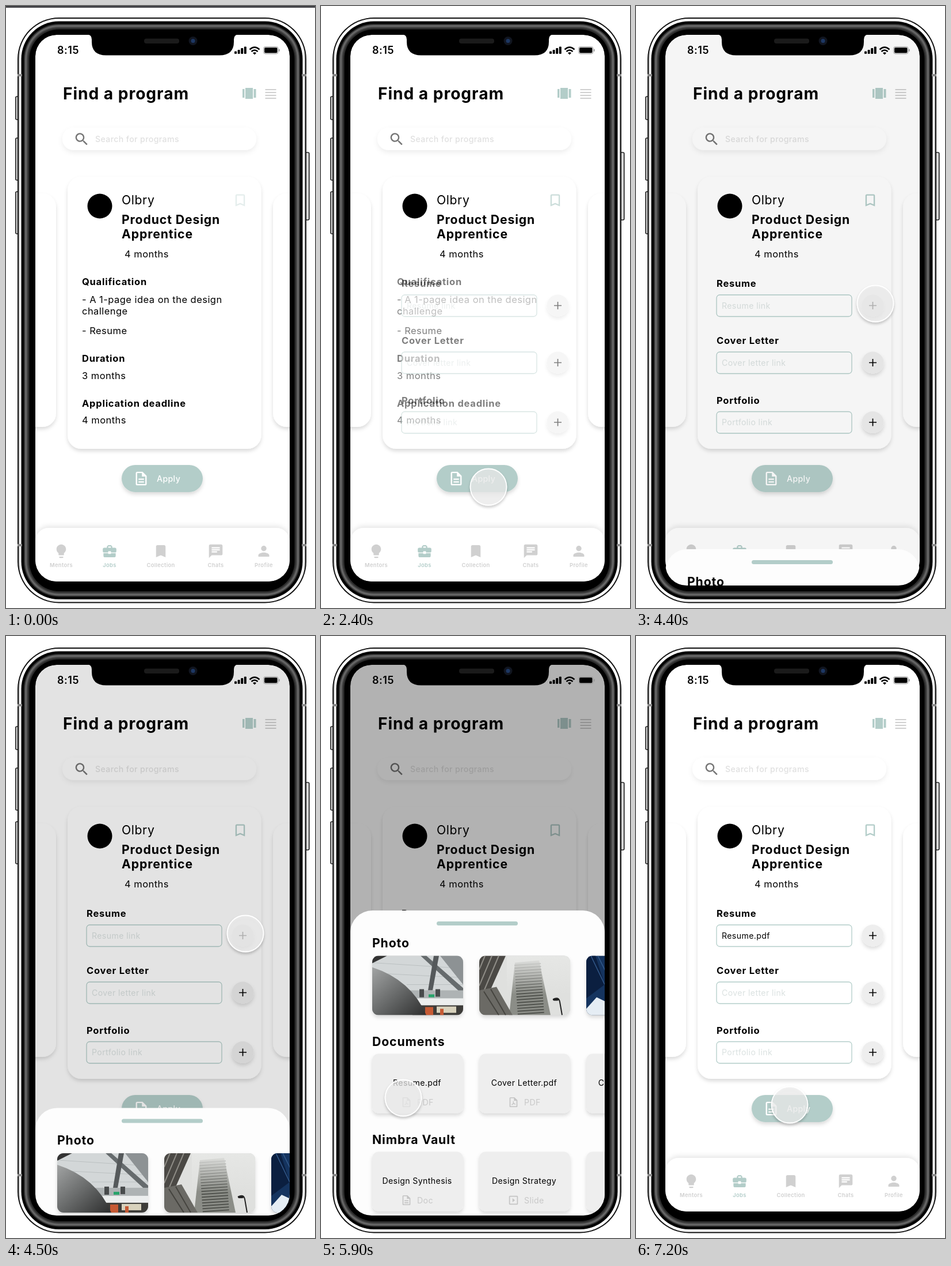
Recreate the animation shown at these times as an HTML page. Size 537 px wide and 1044 px high, loop 7.3 s.

```html
<!DOCTYPE html>
<html lang="en">
<head>
<meta charset="utf-8">
<title>Program finder</title>
<style>
html, body { margin: 0; width: 100%; height: 100%; overflow: hidden; background: #fff; }
svg { display: block; width: 537px; height: 1044px; }
text { font: 400 16.5px Inter, "Open Sans", sans-serif; letter-spacing: .028em; }
.title { font-size: 28.2px; font-weight: 700; letter-spacing: .033em; }
.head { font-size: 21.2px; font-weight: 700; letter-spacing: .042em; }
.name { font-size: 21.2px; }
.bold { font-weight: 700; letter-spacing: .046em; }
.small { font-size: 14.1px; }
.mid { font-size: 14.1px; font-weight: 500; }
.clock { font-size: 18px; font-weight: 600; }
.nav { font-size: 9.4px; font-weight: 600; letter-spacing: .036em; text-anchor: middle; }
.file { font-size: 14.1px; text-anchor: middle; }
</style>
</head>
<body>
<svg id="stage" viewBox="0 0 537 1044"></svg>
<script>
const GREEN = '#b3cdc9', GREY = '#d0d0d0';

const ICONS = {
  search: 'M15.5 14h-.8l-.3-.3A6.5 6.5 0 1 0 13.700 14.400l.3.3v.8l5 5 1.500-1.500zM9.500 14a4.500 4.500 0 1 1 0-9 4.500 4.500 0 0 1 0 9z',
  bulb: 'M9 21c0 .5.4 1 1 1h4c.6 0 1-.5 1-1v-1H9zM12 2C8.100 2 5 5.100 5 9c0 2.400 1.200 4.500 3 5.700V17c0 .5.4 1 1 1h6c.6 0 1-.5 1-1v-2.300c1.800-1.300 3-3.400 3-5.700 0-3.900-3.100-7-7-7z',
  jobs: 'M10 16v-1H3v4c0 1.100.9 2 2 2h14c1.100 0 2-.9 2-2v-4h-7v1zM20 7h-4V5l-2-2h-4L8 5v2H4c-1.100 0-2 .9-2 2v3c0 1.100.9 2 2 2h6v-2h4v2h6c1.100 0 2-.9 2-2V9c0-1.100-.9-2-2-2zM14 7h-4V5h4z',
  mark: 'M17 3H7c-1.100 0-2 .9-2 2v16l7-3 7 3V5c0-1.100-.9-2-2-2z',
  chat: 'M20 2H4c-1.100 0-2 .9-2 2v18l4-4h14c1.100 0 2-.9 2-2V4c0-1.100-.9-2-2-2zM6 9h12v2H6zM14 14H6v-2h8zM18 8H6V6h12z',
  person: 'M12 12a4 4 0 1 0 0-8 4 4 0 0 0 0 8zM12 14c-2.700 0-8 1.300-8 4v2h16v-2c0-2.700-5.300-4-8-4z',
  page: 'M14 2H6c-1.100 0-2 .9-2 2v16c0 1.100.9 2 2 2h12c1.100 0 2-.9 2-2V8zM18 20H6V4h7v5h5z',
  slide: 'M10 8v8l5-4zM19 3H5c-1.100 0-2 .9-2 2v14c0 1.100.9 2 2 2h14c1.100 0 2-.9 2-2V5c0-1.100-.9-2-2-2zM19 19H5V5h14z'
};
ICONS.outline = ICONS.mark + 'M17 18l-5-2.200L7 18V5h10z';
ICONS.doc = ICONS.page + 'M8 16h8v2H8zM8 12h8v2H8z';
ICONS.pdf = ICONS.page + 'M8 17l3-3v-4h1.500v3.500l3.500 2v1.500l-4-1.500-3 2.500z';

const icon = (name, cx, cy, fill, s = 1.18) =>
  `<path transform="translate(${cx - 12 * s} ${cy - 12 * s}) scale(${s})" fill="${fill}" fill-rule="evenodd" d="${ICONS[name]}"/>`;
const rect = (x, y, w, h, r, fill, more = '') =>
  `<rect x="${x}" y="${y}" width="${w}" height="${h}" rx="${r}" fill="${fill}" ${more}/>`;
const text = (x, y, str, cls = '', fill = '#000', more = '') =>
  `<text x="${x}" y="${y}" class="${cls}" fill="${fill}" ${more}>${str}</text>`;
const poly = (points, fill) => `<polygon points="${points}" fill="${fill}"/>`;
const line = (d, stroke, w, more = '') =>
  `<path d="${d}" fill="none" stroke="${stroke}" stroke-width="${w}" ${more}/>`;
const SHADOW = 'filter="url(#drop)"';

const defs = `<defs>
  <filter id="drop" x="-20%" y="-30%" width="140%" height="170%"><feDropShadow dx="0" dy="4" stdDeviation="3" flood-opacity=".14"/></filter>
  <filter id="soft" x="-20%" y="-30%" width="140%" height="170%"><feDropShadow dx="0" dy="4" stdDeviation="4" flood-opacity=".07"/></filter>
  <filter id="lift" x="-10%" y="-30%" width="120%" height="160%"><feDropShadow dx="0" dy="-3" stdDeviation="4" flood-opacity=".1"/></filter>
  <filter id="press" x="-30%" y="-30%" width="160%" height="170%"><feDropShadow dx="0" dy="3" stdDeviation="2" flood-opacity=".25"/></filter>
  <clipPath id="screen"><rect x="51" y="50" width="442" height="948" rx="37"/></clipPath>
  <clipPath id="full"><rect x="51" y="50" width="442" height="955" rx="37"/></clipPath>
  <clipPath id="photo"><rect width="158" height="103" rx="11"/></clipPath>
  <linearGradient id="cone" x2="1" y2="1"><stop stop-color="#a2a4a4"/><stop offset=".5" stop-color="#686a6a"/><stop offset="1" stop-color="#2d2e2e"/></linearGradient>
  <linearGradient id="fog" x2="0" y2="1"><stop stop-color="#e6e7e5"/><stop offset=".65" stop-color="#e6e7e5" stop-opacity="0"/></linearGradient>
  <linearGradient id="rim" x2="1" y2="0"><stop stop-color="#aaa"/><stop offset=".006" stop-color="#fff"/><stop offset=".994" stop-color="#fff"/><stop offset="1" stop-color="#aaa"/></linearGradient>
</defs>`;

// Nested rounded rectangles: [inset, fill]
const body = () => {
  const keys = [[16, 157, 40], [16, 229, 73], [16, 322, 73], [519, 254, 117]]
    .map(([x, y, h]) => rect(x + .8, y, 7, h, 2, '#d5d5d5', 'stroke="#222" stroke-width="1.6"')).join('');
  const rings = [[0, '#111'], [2, 'url(#rim)'], [6.5, '#000'], [11, '#333'], [13, '#666'], [16, '#484848'], [18, '#2c2c2c'], [20.5, '#000']]
    .map(([i, f]) => rect(20 + i, 20 + i, 502 - 2 * i, 1015.5 - 2 * i, 72 - i, f)).join('');
  const bands = [120, 935].map(y => rect(20, y - 2, 8, 4, 0, '#8a8a8a') + rect(514, y - 2, 8, 4, 0, '#8a8a8a')).join('');
  return keys + rings + bands;
};

const notch = `<path d="M141 49Q149 50 149 58V62Q149 85.500 174 85.500H371Q396 85.500 396 62V58Q396 50 404 49Z"/>`
  + rect(240, 56.500, 61, 8.500, 4, '#1b1b1b')
  + '<circle cx="325" cy="60.500" r="7.500" fill="#11151f"/><circle cx="325" cy="60.500" r="3.500" fill="#1d3763"/>';

const status = text(89, 83, '8:15', 'clock')
  + [4.500, 7, 10, 12.500].map((h, i) => rect(397 + i * 5.600, 83 - h, 4, h, 1, '#000')).join('')
  + line('M423.500 75.500Q432 67.500 440.500 75.500M426.500 79Q432 74 437.500 79', '#000', 2.600)
  + '<path d="M429 81.500Q432 79 435 81.500L432 84.500Z"/>'
  + rect(447.500, 70.500, 25.500, 12.500, 3.500, 'none', 'stroke="#999"') + rect(449, 72, 22.500, 9.500, 2, '#000')
  + rect(474, 74.500, 1.600, 4.500, .8, '#999');

const header = text(99, 161.500, 'Find a program', 'title')
  + rect(411, 144, 3.500, 15, 0, GREEN) + rect(416, 142, 13, 19, 0, GREEN) + rect(430.500, 144, 4, 15, 0, GREEN)
  + [145, 150, 155, 160].map(y => rect(450.500, y - 1, 19, 2, 0, GREY)).join('')
  + rect(98, 211, 337, 39, 19.500, '#fff', 'filter="url(#soft)"')
  + icon('search', 131.500, 231, '#757575', 1.200)
  + text(155, 236, 'Search for programs', 'mid', '#e0e0e0');

const cards = rect(-250, 325, 337, 405, 24, '#fff', SHADOW) + rect(464, 325, 337, 405, 24, '#fff', SHADOW)
  + rect(107, 296, 336.500, 472, 24, '#fff', SHADOW)
  + '<circle cx="163" cy="347" r="21.500"/>'
  + text(201, 343.500, 'Olbry', 'name')
  + text(201, 378, 'Product Design', 'head') + text(201, 403, 'Apprentice', 'head')
  + text(206, 436, '4 months')
  + `<g id="save">${icon('outline', 407, 337, GREEN)}</g>`;

const details = [
  [484, 'Qualification', 'bold'], [515, '- A 1-page idea on the design'], [535, 'challenge'], [569, '- Resume'],
  [617, 'Duration', 'bold'], [647, '3 months'], [695, 'Application deadline', 'bold'], [724, '4 months']
].map(([y, s, c]) => text(132, y, s, c)).join('');

const field = (y, label, hint, labelY) => text(140, labelY, label, 'bold')
  + rect(140, y, 235, 37.500, 5.500, '#fff', `stroke="${GREEN}" stroke-width="1.300"`)
  + text(149, y + 23.500, hint, 'small', '#dbe2e1', label == 'Resume' ? 'id="hint"' : '')
  + `<circle cx="411.500" cy="${y + 18.500}" r="19" fill="#eee" ${SHADOW}/>`
  + line(`M405 ${y + 18.500}h13m-6.500-6.500v13`, '#000', 1.700);
const form = field(501, 'Resume', 'Resume link', 487) + field(600, 'Cover Letter', 'Cover letter link', 585.500)
  + field(703.500, 'Portfolio', 'Portfolio link', 689.500) + text(149, 524.500, 'Resume.pdf', 'small', '#000', 'id="chosen"');

const button = rect(201, 796, 141, 47, 23.500, GREEN, SHADOW) + icon('doc', 235, 819.500, '#fff')
  + text(262, 824.500, 'Apply', 'mid', '#fff');

const nav = rect(51, 905, 442, 140, 24, '#fff', 'filter="url(#lift)"')
  + [['bulb', 96, 'Mentors'], ['jobs', 180, 'Jobs'], ['mark', 269, 'Collection'], ['chat', 364.500, 'Chats'], ['person', 448, 'Profile']]
    .map(([name, x, label]) => {
      const c = name == 'jobs' ? GREEN : GREY;
      return icon(name, x, 945.500, c) + text(x, 972.500, label, 'nav', c);
    }).join('');

const photos = [
  rect(0, 0, 158, 103, 0, '#d3d7d8') + line('M0 12L158 22M0 30L158 38M60 50H158', '#bbc0c1', 1)
    + poly('0,0 26,0 0,13', '#333') + poly('118,0 158,0 158,50', '#8d9294') + poly('84,0 94,0 158,56 158,68', '#666b6d')
    + poly('107,0 116,0 105,60 97,60', '#55595b')
    + rect(60, 60, 98, 14, 0, '#aeb3b4') + rect(82, 58, 8, 14, 0, '#484b4c') + rect(110, 58, 8, 13, 0, '#484b4c')
    + rect(98, 67, 10, 5, 0, '#27a36a') + rect(60, 74, 98, 12, 0, '#eceeee') + rect(70, 86, 88, 17, 0, '#3d3c39')
    + rect(92, 89, 14, 14, 0, '#c65a34') + rect(112, 88, 34, 11, 0, '#d8d2bd') + rect(118, 92, 6, 11, 0, '#c65a34')
    + '<path d="M0 20Q68 42 94 103H0Z" fill="url(#cone)"/>',
  rect(0, 0, 158, 103, 0, '#dfe0de') + poly('0,0 46,0 20,58 0,80', '#4b4945')
    + line('M10 0L0 24M22 0L0 52M34 0L6 66', '#8f8d87', 2) + poly('62,12 104,8 124,103 52,103', '#8b8d87')
    + line('M84 14L90 103', '#50524d', 46, 'stroke-dasharray="2 3"') + poly('0,60 30,54 58,103 0,103', '#6b6a65')
    + line('M8 62L34 103M20 58L46 103', '#45443f', 2) + rect(48, 0, 110, 103, 0, 'url(#fog)')
    + line('M128 76Q138 70 140 80L144 103', '#222', 2) + rect(128, 74, 10, 4, 2, '#222'),
  rect(0, 0, 158, 103, 0, '#15345f') + poly('0,0 16,0 32,50 0,74', '#0b1f40') + poly('0,92 18,72 60,92 60,103 0,103', '#e5edf4')
    + line('M8 0L32 50M20 0L40 40', '#32598a', 1.500)
];

const COLS = [89, 275, 461];
const files = (y, items) => items.map(([name, ic, kind], i) => rect(COLS[i], y, 158, 103, 11, '#eee', SHADOW)
  + text(COLS[i] + 78, y + 55.500, name, 'file') + icon(ic, COLS[i] + 59.500, y + 84, '#c4c4c4', .86)
  + text(COLS[i] + 78, y + 89.500, kind, 'small', '#c8c8c8')).join('');

const sheet = rect(51, 476, 442, 640, 38, '#fdfdfd') + rect(201, 495, 141, 7, 3.500, GREEN)
  + text(89, 539.500, 'Photo', 'head') + text(89, 710.500, 'Documents', 'head') + text(89, 881, 'Nimbra Vault', 'head')
  + photos.map((p, i) => `<g transform="translate(${COLS[i]} 554.500)">${rect(0, 0, 158, 103, 11, '#ccc', SHADOW)}<g clip-path="url(#photo)">${p}</g></g>`).join('')
  + files(724.500, [['Resume.pdf', 'pdf', 'PDF'], ['Cover Letter.pdf', 'pdf', 'PDF'], ['Cover Letter.pdf', 'pdf', 'PDF']])
  + files(894.500, [['Design Synthesis', 'doc', 'Doc'], ['Design Strategy', 'slide', 'Slide'], ['Class Notes', 'doc', 'Doc']]);

const $ = id => document.getElementById(id);
$('stage').innerHTML = defs + body()
  + `<g clip-path="url(#screen)">${rect(51, 50, 442, 948, 37, '#fff')}${header}${cards}<g id="details">${details}</g><g id="form">${form}</g>${button}${nav}</g>`
  + `<g id="modal" clip-path="url(#full)">${rect(51, 50, 442, 955, 0, '#000', 'id="dim"')}<g id="sheet">${sheet}</g></g>`
  + notch + status
  + '<circle id="touch" r="31.500" fill="#f0f0f0" fill-opacity=".7" stroke="#fff" stroke-width="1.800" filter="url(#press)"/>'
  + rect(0, 0, 537, 3, 0, '#434347', 'id="bar"');

// Touch path: time, x, y
const PATH = [[300, 569, 845], [1100, 291, 834], [3300, 291, 834], [3400, 365, 700], [3600, 418, 582], [3900, 411, 533],
  [4000, 411, 533], [4200, 416, 516], [5100, 416, 516], [5900, 143, 801], [6700, 143, 801], [7200, 267, 813]];

const ramp = (t, start, length) => Math.min(1, Math.max(0, (t - start) / length));
const easeOut = p => 1 - (1 - p) ** 2;
const smooth = p => p * p * (3 - 2 * p);
const set = (id, key, value) => $(id).setAttribute(key, value);

function touchAt(t) {
  const i = Math.max(1, PATH.findIndex(k => k[0] >= t));
  const [t0, x0, y0] = PATH[i - 1], [t1, x1, y1] = PATH[i];
  const p = smooth(ramp(t, t0, t1 - t0));
  return [x0 + (x1 - x0) * p, y0 + (y1 - y0) * p];
}

function draw(t) {
  const toForm = ramp(t, 2300, 200);
  const rise = easeOut(ramp(t, 4350, 750));
  const leave = easeOut(ramp(t, 5950, 210));
  set('details', 'opacity', 1 - toForm);
  set('form', 'opacity', toForm);
  set('save', 'opacity', .35 + .65 * toForm);
  set('hint', 'opacity', t < 6000 ? 1 : 0);
  set('chosen', 'opacity', t < 6000 ? 0 : 1);
  set('modal', 'opacity', rise > 0 ? 1 - leave : 0);
  set('dim', 'opacity', .3 * rise);
  set('sheet', 'transform', `translate(0 ${(1 - rise) * 535})`);
  set('bar', 'opacity', t < 400 ? 1 : 1 - ramp(t, 300, 1040));
  const [x, y] = touchAt(t);
  set('touch', 'cx', x);
  set('touch', 'cy', y);
  set('touch', 'visibility', t < 400 ? 'hidden' : 'visible');
}

// The picture advances ten times a second.
const begin = performance.now();
function frame() {
  draw(Math.floor((performance.now() - begin) % 7300 / 100) * 100);
  requestAnimationFrame(frame);
}
frame();
</script>
</body>
</html>
```
